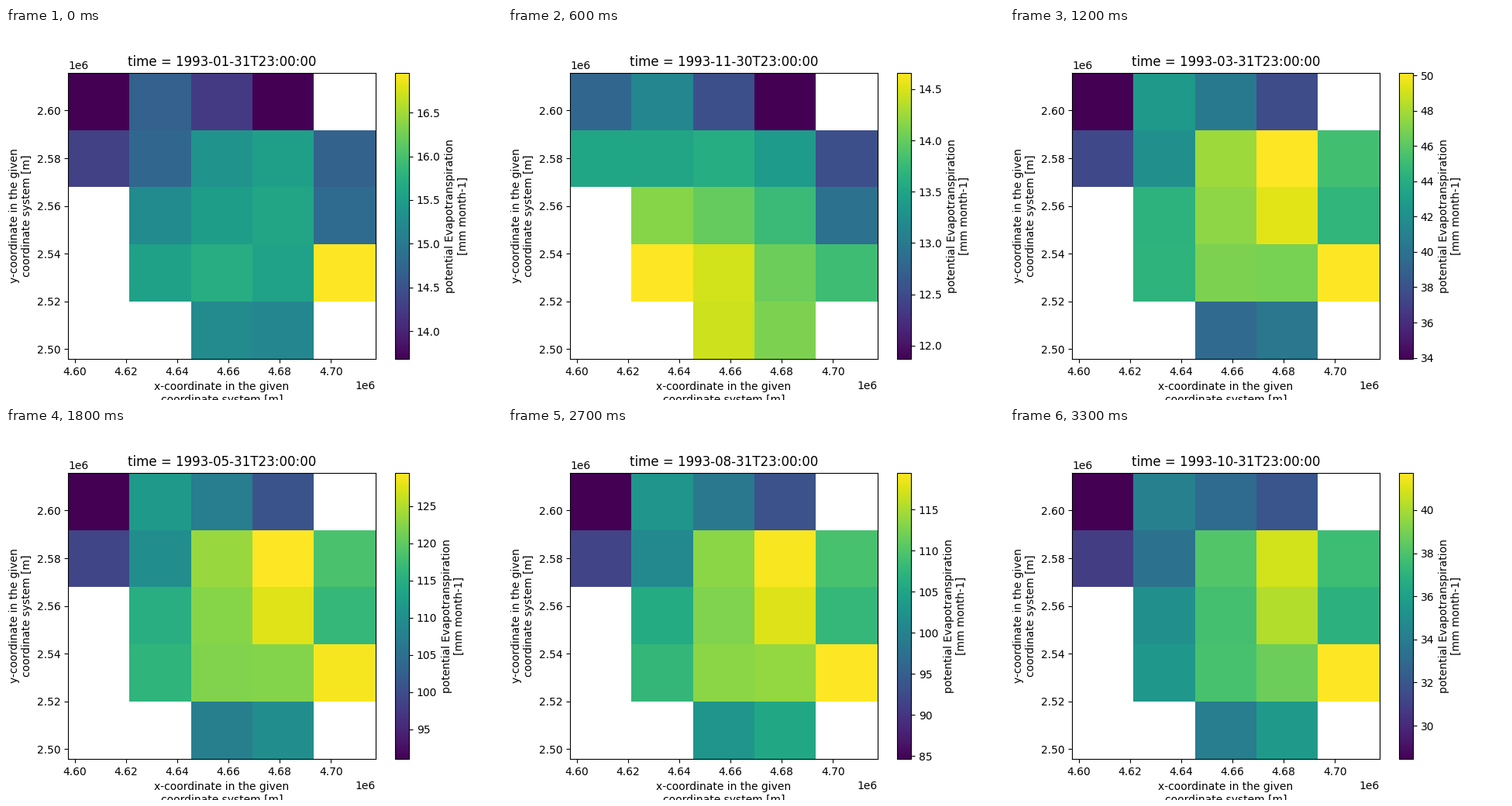
A matplotlib script for the animation above (3600 ms loop, 640 by 480 pixels).

```python
import numpy as np
import matplotlib.pyplot as plt
from matplotlib.animation import FuncAnimation

X0, Y0, CELL = 4597370, 2495850, 24000
NO = np.nan

# Months are shown in text order of their zero-based index: 0, 1, 10, 11, 2, ...
ORDER = sorted(range(12), key=str)

# Midsummer pattern as a share of the colour range, north row first
SUMMER = np.array([[0, .54, .43, .28, NO],
                   [.19, .48, .84, 1, .73],
                   [NO, .61, .81, .95, .68],
                   [NO, .65, .82, .83, .97],
                   [NO, NO, .51, .58, NO]])
row, col = np.indices(SUMMER.shape)

# Spatial effects that bend the summer pattern through the year
SOUTHWEST = row - col
WARM_SPOT = np.exp(-4 * ((row - 3) ** 2 + (col - 4) ** 2))
SOUTH_EDGE = (row / 4) ** 4
MIDWEST = np.exp(-((col - 1.4) / 0.9) ** 2)

# Strength of each effect at key months, interpolated in between
KEYS = [0, 2, 6, 8, 9, 10, 12]
GAIN = [.6, 1, 1, 1, 1, .5, .6]
TILT = [.055, .02, 0, .02, 0, .15, .055]
WARM = [.35, .08, 0, .06, .1, 0, .35]
COOL_SOUTH = [0, .22, 0, 0, 0, 0, 0]
COOL_WEST = [0, 0, 0, .04, .1, 0, 0]

# Colour range of each month (mm per month)
LOW = [13.68, 18.96, 33.93, 62.3, 91.02, 101.5,
       102.55, 84.65, 47.4, 28.45, 11.869, 10.37]
HIGH = [16.957, 24.9, 50.15, 89.2, 129.52, 144.1,
        149.04, 119.5, 67.455, 41.74, 14.661, 13.3]


def field(month):
    gain, tilt, warm, south, west = (
        np.interp(month, KEYS, k)
        for k in (GAIN, TILT, WARM, COOL_SOUTH, COOL_WEST))
    grid = (gain * SUMMER + tilt * SOUTHWEST + warm * WARM_SPOT
            - south * SOUTH_EDGE - west * MIDWEST)
    low, high = np.nanmin(grid), np.nanmax(grid)
    share = (grid - low) / (high - low)
    return LOW[month] + (HIGH[month] - LOW[month]) * share


def month_end(month):
    following = np.datetime64("1993-01", "M") + (month + 1)
    return following.astype("datetime64[D]") - 1


fig = plt.figure(figsize=(6.4, 4.8), dpi=100)
xs = X0 + CELL * np.arange(6)
ys = Y0 + CELL * np.arange(6)


def draw(i):
    month = ORDER[i]
    fig.clf()
    ax = fig.add_subplot()
    mesh = ax.pcolormesh(xs, ys, np.ma.masked_invalid(field(month)[::-1]),
                         cmap="viridis", vmin=LOW[month], vmax=HIGH[month])
    ax.set_xlim(xs[0], xs[-1])
    ax.set_ylim(ys[0], ys[-1])
    ax.set_title(f"time = {month_end(month)}T23:00:00")
    ax.set_xlabel("x-coordinate in the given\ncoordinate system [m]")
    ax.set_ylabel("y-coordinate in the given\ncoordinate system [m]")
    bar = fig.colorbar(mesh, ax=ax)
    bar.set_label("potential Evapotranspiration\n[mm month-1]")
    return []


anim = FuncAnimation(fig, draw, frames=12, interval=300, repeat=True,
                     repeat_delay=0, blit=False)
plt.show()
```
